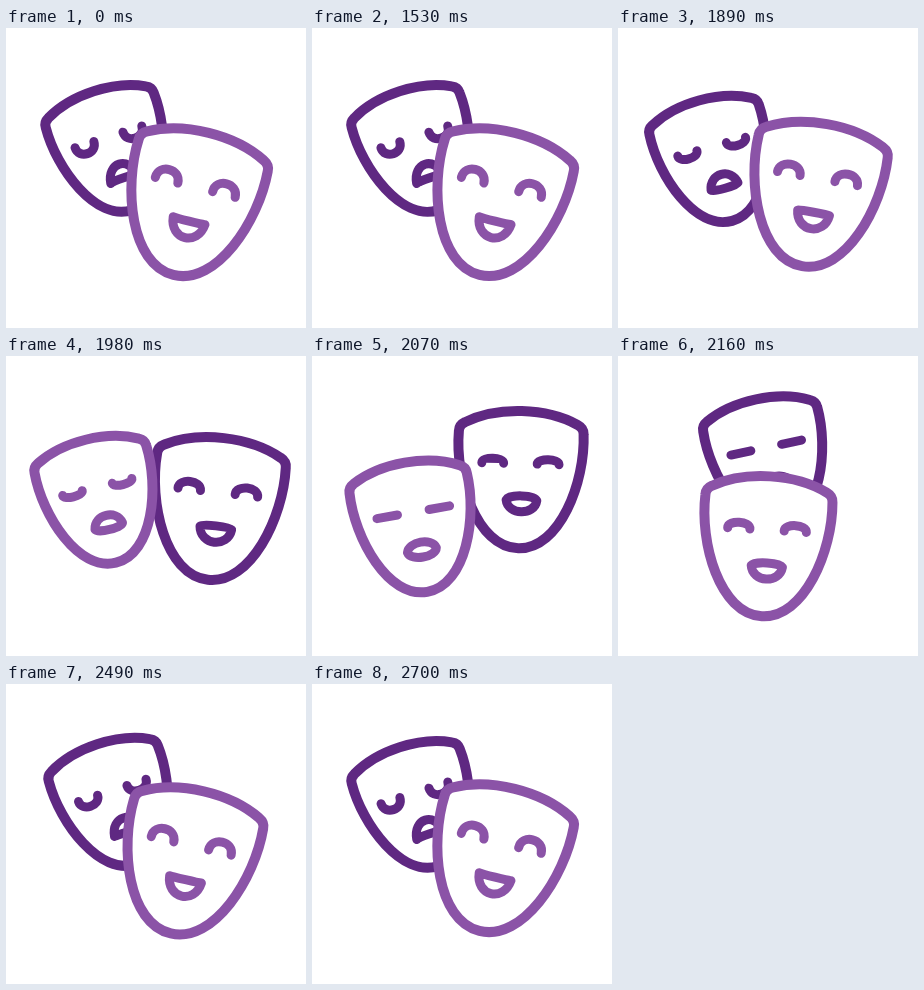
Write an HTML page that moves like this. It is 300 px wide and 300 px high and loops after 2730 ms.

```html
<!DOCTYPE html>
<html lang="en">
<head>
<meta charset="utf-8">
<title>Theatre masks</title>
<style>
  html, body { margin: 0; width: 100%; height: 100%; overflow: hidden; background: #fff; }
  svg { display: block; width: 100%; height: 100%; }
  path { fill: none; stroke-width: 9; stroke-linecap: round; stroke-linejoin: round; vector-effect: non-scaling-stroke; }
  .shell { fill: #fff; stroke-width: 10; }
  #back { stroke: #5f2882; }
  #front { stroke: #8b53a7; }
</style>
</head>
<body>
<svg viewBox="0 0 300 300">
  <defs>
    <path id="shell" d=""/>
  </defs>
  <g id="back"><path class="shell"/><path class="face"/></g>
  <g id="front"><path class="shell"/><path class="face"/></g>
</svg>
<script>
const LOOP = 2730, STEP = 30, SWAP = 1980;
const SHELL = 'M-63-48Q-63-54-57-57C-25-74 25-74 57-57Q63-54 63-48C66 0 42 69 0 69C-42 69-66 0-63-48Z';

// Key times, then per mask: x, y, turn, scale, mood (-1 sad, 1 happy)
const times = [1500, 1890, 2010, 2070, 2160, 2340, 2700];
const rightToBack = {
  x: [185, 196.5, 212, 208, 151.4, 118, 107],
  y: [176.3, 167.5, 146, 124, 106.5, 117, 123],
  turn: [14, 10, 5, 1.5, -12, -18.5, -18],
  scale: [1.055, 1.04, 1.02, 0.99, 0.925, 0.92, 0.9],
  mood: [1, 0.87, 0.65, 0.45, 0, -0.65, -1]
};
const leftToFront = {
  x: [107, 97.6, 94.5, 104, 148, 174.7, 185],
  y: [123, 133, 152, 171.6, 190.7, 182.5, 176.3],
  turn: [-18, -15.5, -13, -10, 3.5, 11.5, 14],
  scale: [0.9, 0.9, 0.92, 0.945, 1.01, 1.045, 1.055],
  mood: [-1, -0.6, -0.3, 0, 0.58, 0.93, 1]
};

// Monotone cubic interpolation, at rest at both ends
function slope(v, i) {
  if (i === 0 || i === times.length - 1) return 0;
  const h0 = times[i] - times[i - 1], h1 = times[i + 1] - times[i];
  const d0 = (v[i] - v[i - 1]) / h0, d1 = (v[i + 1] - v[i]) / h1;
  if (d0 * d1 <= 0) return 0;
  const w0 = 2 * h1 + h0, w1 = h1 + 2 * h0;
  return (w0 + w1) / (w0 / d0 + w1 / d1);
}

function sample(v, t) {
  const last = times.length - 1;
  if (t <= times[0]) return v[0];
  if (t >= times[last]) return v[last];
  const i = times.findIndex(k => k > t) - 1;
  const h = times[i + 1] - times[i], u = (t - times[i]) / h;
  const u2 = u * u, u3 = u2 * u;
  return v[i] * (2 * u3 - 3 * u2 + 1) + v[i + 1] * (3 * u2 - 2 * u3) +
    h * (slope(v, i) * (u3 - 2 * u2 + u) + slope(v, i + 1) * (u3 - u2));
}

function arc(x0, x1, y, mid, inset = 0) {
  const c = y + (mid - y) * 4 / 3, k = Math.sign(x1 - x0) * inset;
  return `C${x0 + k} ${c} ${x1 - k} ${c} ${x1} ${y}`;
}

function eye(x, mood) {
  const y = -16.5;
  return `M${x - 11} ${y}` + arc(x - 11, x + 11, y, y - 10.5 * mood);
}

function mouth(mood) {
  const l = -13.5, r = 17.5, y = 24.5 - 9 * mood;
  return `M${l} ${y}` + arc(l, r, y, 16, 3) + arc(r, l, y, 32, 2) + 'Z';
}

function pose(mask, track, t) {
  const at = key => sample(track[key], t);
  const mood = at('mood');
  mask.setAttribute('transform',
    `translate(${at('x')} ${at('y')}) rotate(${at('turn')}) scale(${at('scale')})`);
  mask.querySelector('.face').setAttribute('d', eye(-28, mood) + eye(28, mood) + mouth(mood));
}

const back = document.getElementById('back');
const front = document.getElementById('front');
document.getElementById('shell').remove();
for (const shell of document.querySelectorAll('.shell')) shell.setAttribute('d', SHELL);

function draw(now) {
  const t = Math.floor((now % LOOP) / STEP) * STEP;
  const swapped = t >= SWAP;
  pose(back, swapped ? rightToBack : leftToFront, t);
  pose(front, swapped ? leftToFront : rightToBack, t);
}

const start = performance.now();
function tick() {
  draw(performance.now() - start);
  requestAnimationFrame(tick);
}
tick();
</script>
</body>
</html>
```
